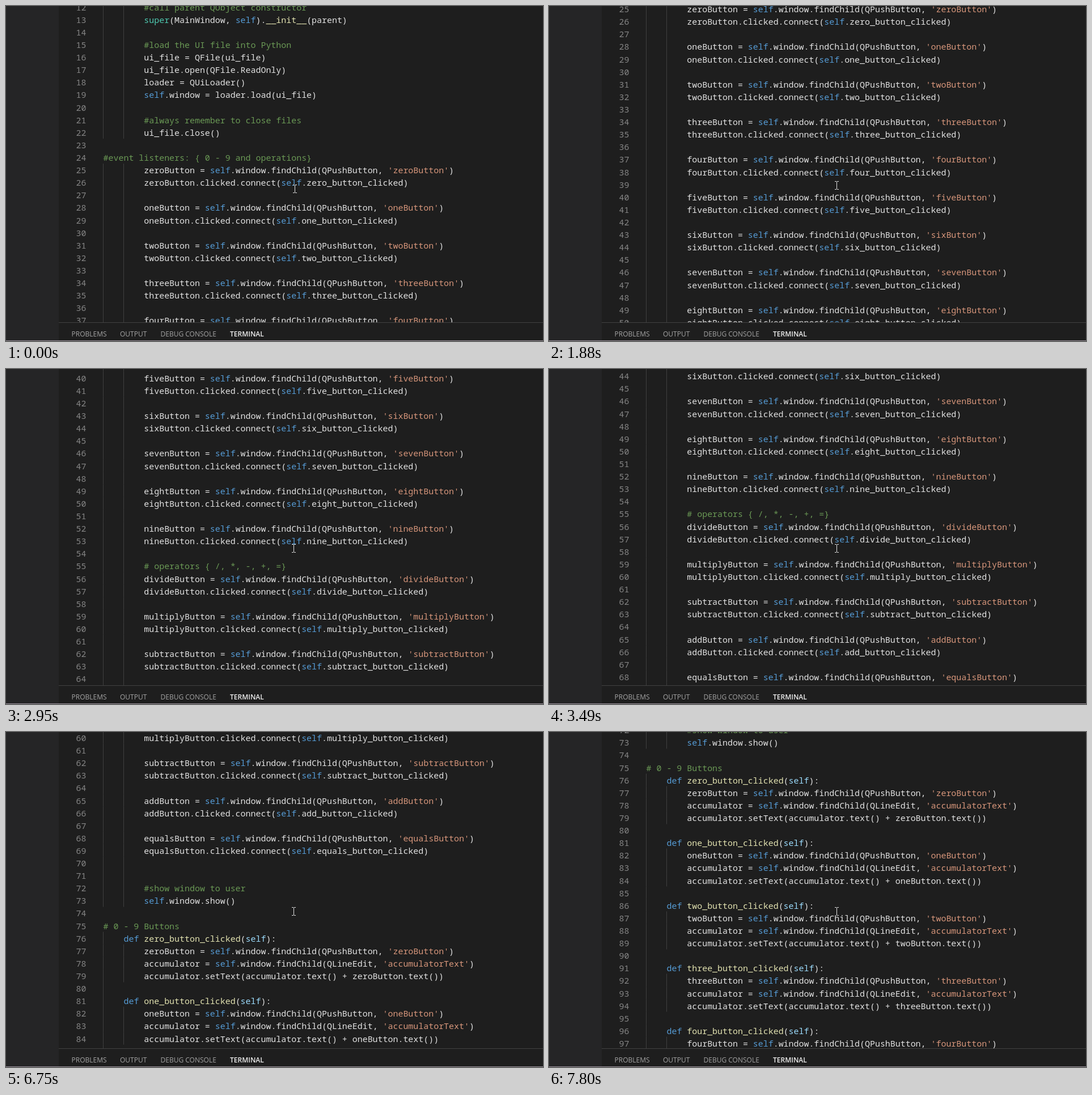
An HTML page that plays this animation: 947 by 591 pixels, repeating every 8 s.

```html
<!DOCTYPE html>
<html lang="en">
<head>
<meta charset="utf-8">
<title>Code editor scrolling</title>
<style>
  html, body { margin: 0; width: 100%; height: 100%; overflow: hidden; background: #1e1e1e; }
  body { position: relative; }
  body div, body svg, .tab { position: absolute; }
  #sidebar { left: 0; top: 0; width: 92.5px; height: 590px; background: #252526; }
  #editor { left: 93px; top: 0; right: 0; height: 558px; overflow: hidden; }
  #code, #hover { font: 500 14.95px/22.11px "Noto Sans Mono", monospace; color: #e2e2e2; white-space: pre; }
  #code { left: -93px; top: 0; }
  .number { left: 123.6px; color: #858585; font-weight: 400; }
  .text { left: 171.6px; }
  .guide { width: 1px; height: 22.5px; background: #404040; }
  .comment { color: #6a9955; font-weight: 400; }
  .string { color: #d7967b; }
  .keyword { color: #569cd6; }
  .type { color: #4ec9b0; }
  .name { color: #e2e2b0; }
  .param { color: #9cdcfe; }
  #word { left: 485px; top: 301px; width: 36px; height: 22px; background: #264f7840; }
  #hover { left: 485px; top: 271px; width: 162px; height: 29px; line-height: 28px;
           text-indent: 9.3px; background: #252526; border: 1px solid #454545; }
  #panel { left: 93px; top: 558px; right: 0; height: 32px; border-top: 1px solid #424242; box-sizing: border-box; }
  .tab { top: 571px; font: 12px/16px "Open Sans", sans-serif; color: #a4a4a4; white-space: pre; }
  .active { color: #f0f0f0; font-weight: 600; }
  #status { left: 0; right: 0; top: 590px; height: 1px; background: #9c929c; }
  #cursor { left: 0; top: 0; mix-blend-mode: difference; }
</style>
</head>
<body>
<div id="sidebar"></div>
<div id="editor"><div id="code"></div></div>
<div id="word"></div>
<div id="hover"><span class="keyword">self</span>: MainWindow</div>
<div id="panel"></div>
<span class="tab" style="left:115.5px">PROBLEMS</span>
<span class="tab" style="left:201px">OUTPUT</span>
<span class="tab" style="left:272.5px">DEBUG CONSOLE</span>
<span class="tab active" style="left:395px">TERMINAL</span>
<div id="status"></div>
<svg id="cursor" width="7" height="16" fill="none" stroke="#fff">
  <path d="M0 .5H3M4 .5H7M3.5 1V14M0 14.5H3M4 14.5H7"/>
</svg>
<script>
const LOOP = 8000, FIRST_LINE = 12, LINE = 22.11, CHAR = 8.97;
const byId = id => document.getElementById(id);
const code = byId('code'), cursor = byId('cursor');
const tab = '    ', deep = tab + tab;

const find = name => `${deep}${name}Button = self.window.findChild(QPushButton, '${name}Button')`;
const listener = name => [find(name), `${deep}${name}Button.clicked.connect(self.${name}_button_clicked)`, ''];
const handler = name => [
  `${tab}def ${name}_button_clicked(self):`,
  find(name),
  `${deep}accumulator = self.window.findChild(QLineEdit, 'accumulatorText')`,
  `${deep}accumulator.setText(accumulator.text() + ${name}Button.text())`,
  ''
];
const digits = 'zero one two three four five six seven eight nine'.split(' ');
const operators = 'divide multiply subtract add equals'.split(' ');

const lines = [
  ...['#call parent QObject constructor',
    'super(MainWindow, self).__init__(parent)',
    '',
    '#load the UI file into Python',
    'ui_file = QFile(ui_file)',
    'ui_file.open(QFile.ReadOnly)',
    'loader = QUiLoader()',
    'self.window = loader.load(ui_file)',
    '',
    '#always remember to close files',
    'ui_file.close()'].map(s => s && deep + s),
  '',
  '#event listeners: { 0 - 9 and operations}',
  ...digits.flatMap(listener),
  deep + '# operators { /, *, -, +, =}',
  ...operators.flatMap(listener),
  '',
  deep + '#show window to user',
  deep + 'self.window.show()',
  '',
  '# 0 - 9 Buttons',
  ...digits.slice(0, 5).flatMap(handler)
];

function highlight(line) {
  const isDef = line.startsWith(tab + 'def');
  const token = /#.*|'[^']*'|\b(?:self|super|def|__init__)\b|\w+_clicked/g;
  return line.replace(token, s => {
    const kind = s[0] === '#' ? 'comment'
      : s[0] === "'" ? 'string'
      : s === 'super' ? 'type'
      : s === 'self' ? (isDef ? 'param' : 'keyword')
      : s === 'def' ? 'keyword'
      : s === '__init__' || isDef ? 'name' : '';
    return kind ? `<span class="${kind}">${s}</span>` : s;
  });
}

// A blank line takes the smaller indent of its neighbouring code.
const indentOf = line => line.search(/\S/);
function guideDepth(i) {
  if (lines[i]) return indentOf(lines[i]);
  const before = lines.slice(0, i).reverse().find(Boolean);
  const after = lines.slice(i).find(Boolean) || '';
  return Math.min(indentOf(before), indentOf(after));
}

code.innerHTML = lines.map((line, i) => {
  const number = i + FIRST_LINE;
  const y = 278.1 + (number - 25) * LINE;
  let html = `<div class="number" style="top:${y}px">${number}</div>` +
    `<div class="text" style="top:${y}px">${highlight(line)}</div>`;
  for (let col = 0; col < guideDepth(i); col += 4)
    html += `<div class="guide" style="left:${Math.floor(171.6 + col * CHAR)}px;top:${y}px"></div>`;
  return html;
}).join('');

// [time, scroll offset]; each offset holds until the next time
const scrollSteps = [
  [0, 0], [1240, 40], [1360, 79], [1480, 119], [1630, 182], [1880, 284],
  [2000, 324], [2150, 363], [2270, 403], [2420, 450], [2950, 605.5],
  [3100, 631], [3220, 657], [3490, 697.5], [3610, 737], [3770, 776],
  [3910, 816], [4200, 855.5], [6750, 1053.5], [6870, 1076], [7020, 1112],
  [7140, 1153], [7290, 1203], [7410, 1243], [7530, 1283], [7800, 1332.5]
];

function draw(now) {
  const t = now % LOOP;
  const offset = scrollSteps.findLast(([start]) => t >= start)[1];
  code.style.transform = `translateY(${-offset}px)`;
  const hovering = t >= 530 && t < 1240;
  byId('word').hidden = byId('hover').hidden = !hovering;
  cursor.style.transform = t < 120 ? 'translate(506px, 315px)' : 'translate(504px, 309px)';
  requestAnimationFrame(draw);
}
draw(0);
</script>
</body>
</html>
```
